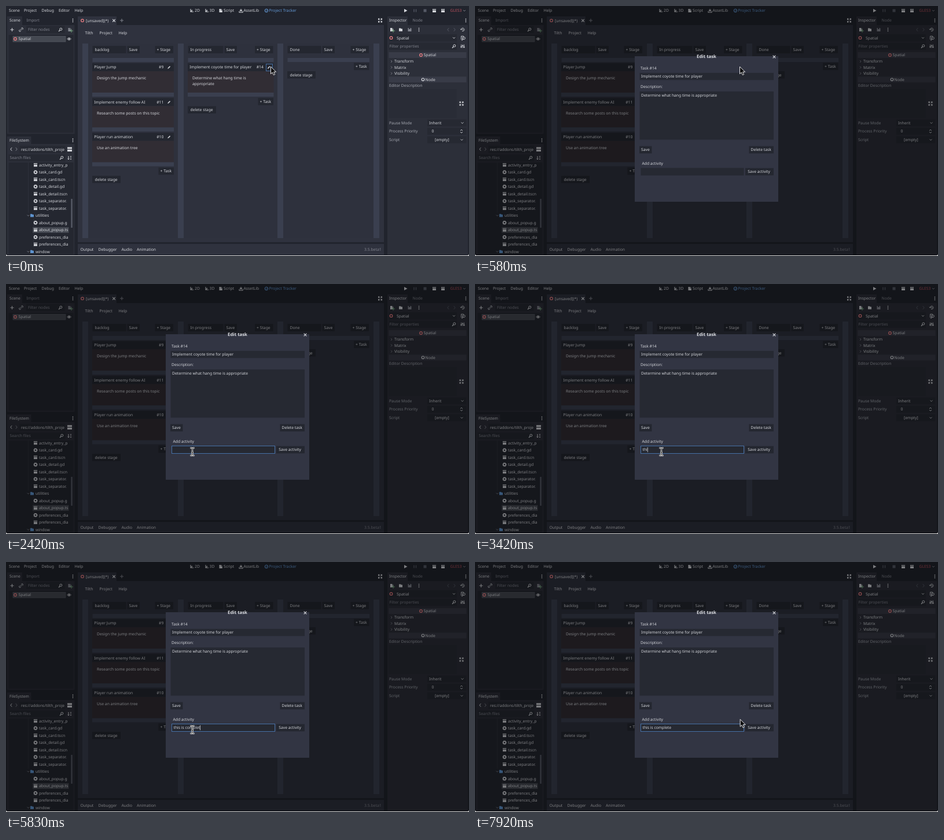
These frames come from a looping animation (800x433 px, 8000 ms). An HTML page:

```html
<!DOCTYPE html>
<html lang="en">
<head>
<meta charset="utf-8">
<title>Task editor</title>
<style>
html, body { margin: 0; width: 100%; height: 100%; overflow: hidden; background: #ddd; }
svg { display: block; width: 800px; height: 433px; }
text { font: 6.8px "Noto Sans", sans-serif; fill: #d5d7dc; white-space: pre; text-rendering: geometricPrecision; }
#dialog text { font-size: 6.74px; }
#dialog #title { font-size: 7.8px; font-weight: bold; }
</style>
</head>
<body>
<svg id="stage" viewBox="0 0 800 433" xmlns="http://www.w3.org/2000/svg"></svg>
<script>
const C = {
  outer: '#21242d', dock: '#2c2f39', panel: '#2f323e', popup: '#323543', dark: '#242730', field: '#262932', button: '#242730',
  bar: '#3a3f4f', board: '#2e313d', group: '#383b47', row: '#444851', body: '#312d34',
  text: '#d5d7dc', dim: '#80838d', faint: '#555965', red: '#f08085', blue: '#659bd8', focus: '#4670a6', folder: '#5f94cf'
};

const rect = (x, y, x2, y2, fill, extra = '') =>
  `<rect x="${x}" y="${y}" width="${x2 - x}" height="${y2 - y}" fill="${fill}" ${extra}/>`;
const text = (x, y, value, fill = C.text, extra = '') =>
  `<text x="${x}" y="${y + 2.4}" style="fill:${fill}" ${extra}>${value}</text>`;
const line = (d, color = C.text, width = 1) =>
  `<path d="${d}" fill="none" stroke="${color}" stroke-width="${width}"/>`;
const shape = (d, color = C.text) => `<path d="${d}" fill="${color}"/>`;
const ring = (x, y, color = C.red) =>
  `<circle cx="${x}" cy="${y}" r="2.3" fill="none" stroke="${color}" stroke-width="1.2"/>`;
const at = (x, y, content) => `<g transform="translate(${x} ${y})">${content}</g>`;

const icon = {
  plus: (x, y, c) => at(x, y, line('M-3 0H3M0-3V3', c)),
  close: (x, y, c) => at(x, y, line('M-2.3-2.3L2.3 2.3M2.3-2.3L-2.3 2.3', c, 1.2)),
  down: (x, y, c) => at(x, y, line('M-2-1L0 1L2-1', c, .9)),
  right: (x, y, c) => at(x, y, line('M-1-2L1 0L-1 2', c, .9)),
  back: (x, y, c) => at(x, y, line('M1.2-2.8L-1.2 0L1.2 2.8', c)),
  forward: (x, y, c) => at(x, y, line('M-1.2-2.8L1.2 0L-1.2 2.8', c)),
  updown: (x, y, c) => icon.down(x, y + 2, c) + at(x, y - 2, line('M-2 1L0-1L2 1', c, .9)),
  dots: (x, y) => at(x, y, line('M0-3.2v1.4M0-.7v1.4M0 1.8v1.4', C.text, 1.4)),
  search: (x, y) => at(x, y, '<circle cx=".8" cy="-.8" r="2" fill="none" stroke="#d5d7dc"/>' + line('M-.6.6L-3 3', C.text, 1.3)),
  gear: (x, y) => at(x, y, '<circle r="2.2" fill="none" stroke="#d5d7dc" stroke-width="1.5"/>' +
    '<circle r="3" fill="none" stroke="#d5d7dc" stroke-width="1.2" stroke-dasharray="1.2 1.156"/>'),
  clapper: (x, y, c) => at(x, y, shape('M-3-.5H3V3H-3ZM-3-3L3-3V-1.2H-3Z', c) + line('M-1.5-3l1 1.8M1-3l1 1.8', C.dark, .7)),
  folder: (x, y, c = C.folder) => at(x, y, shape('M-3-2.5H0L1-1.5H3V2.7H-3Z', c)),
  page: (x, y, c) => at(x, y, shape('M-2.5-3H.5V-.6H2.8V3H-2.5ZM1-3L2.8-1.2H1Z', c)),
  expand: (x, y) => at(x, y, line('M-1-1L-3-3M1-1L3-3M-1 1L-3 3M1 1L3 3', C.text, 1.1) +
    shape('M-3.5-3.5h3l-3 3ZM3.5-3.5v3l-3-3ZM-3.5 3.5v-3l3 3ZM3.5 3.5h-3l3-3Z')),
  pencil: (x, y, c) => at(x, y, line('M-1.6 1.6L1.5-1.5', c, 1.6) + shape('M-2.7 2.7l.5-1.8l1.3 1.3Z', c)),
  axes: (x, y) => at(x, y, line('M-2-3V2H3M-2 2L1-1', C.text, 1.1)),
  eye: (x, y) => at(x, y, line('M-3.3 0Q0-4 3.3 0Q0 4-3.3 0Z', C.text, .9) + '<circle r="1.2" fill="#d5d7dc"/>'),
  sort: (x, y) => at(x, y, line('M-2-3V3M-3.3 1.5L-2 3L-.7 1.5M1-2.5H3M1 0H3M1 2.5H3', C.text, 1))
};

const button = (x, y, x2, label, pad = 3) =>
  rect(x, y - 6.3, x2, y + 6.3, C.button) + text(x + pad, y, label);
const separator = (x, x2, y) => rect(x, y, x2, y + 7, C.bar);

function card(x, x2, y, title, id, lines) {
  return rect(x, y - 7, x2, y + 7, C.dark) + rect(x, y + 7, x2, y + 44, C.body) +
    text(x + 3.3, y, title) + text(x2 - 17.7, y, id, C.text, 'text-anchor="end"') +
    lines.map((s, i) => text(x + 8, y + 19 + i * 10, s)).join('') + separator(x, x2, y + 44);
}

function stageHead(x, x2, name, saveX, addX) {
  return rect(x, 69, saveX - 2, 82, C.dark) + text(x + 4, 75.5, name) +
    button(saveX, 75.5, saveX + 21.5, 'Save') + button(addX, 75.5, x2 - 1, '+ Stage') +
    separator(x, x2, 90);
}

function topBar() {
  const menu = [[5, 'Scene'], [31, 'Project'], [61.5, 'Debug'], [91, 'Editor'], [118.5, 'Help']];
  const modes = [[326, '2D'], [351.5, '3D'], [376, 'Script'], [410.5, 'AssetLib']];
  return [...menu, ...modes].map(([x, s]) => text(x, 8, s)).join('') +
    icon.axes(321, 8) + icon.axes(347, 8) + icon.page(371, 8) +
    at(406, 8, line('M0-3V1M-2-1L0 1L2-1M-3 1V3H3V1', C.text, 1.1)) +
    at(450, 8, `<circle r="2.8" fill="none" stroke="${C.blue}"/>` + line('M-1.4 0L-.2 1.2L1.6-1.2', C.blue, .8)) +
    text(454.5, 8, 'Project Tracker', C.blue) +
    shape('M688 5L693.5 8L688 11Z') + line('M705 5.5v5M708.5 5.5v5', C.faint, 1.4) +
    rect(721.5, 5.5, 726.5, 10.5, C.faint) + icon.clapper(740, 8) + icon.clapper(755, 8) +
    text(767.5, 8, 'GLES3', '#b8505c') + icon.down(792, 8, C.dim);
}

function sceneDock() {
  return rect(2, 18, 28, 34, C.dock) + rect(2, 33, 118.5, 221.5, C.dock) +
    text(6, 25, 'Scene') + text(35.5, 25, 'Import', C.dim) + icon.dots(115.5, 25) +
    icon.plus(10.5, 41) + at(26, 41, line('M-1.2 1.2L1.2-1.2M0-1.8l1-1a1.4 1.4 0 0 1 2 2l-1 1M0 1.8l-1 1a1.4 1.4 0 0 1-2-2l1-1', C.text, .9)) +
    rect(35, 34.5, 101.5, 47, C.field) + text(38, 41, 'Filter nodes', C.dim) + icon.search(94, 41) +
    icon.page(110, 41, C.dim) + icon.plus(113, 43, '#6f9f78') +
    rect(4.5, 50, 116.5, 219.5, C.dark) +
    rect(12, 52.3, 103, 62, C.row, 'stroke="#5a5e69" stroke-width=".6"') +
    ring(16, 57) + text(21.5, 57, 'Spatial') + icon.eye(109, 57);
}

function fileDock() {
  const files = ['activity_entry_p', 'task_card.gd', 'task_card.tscn', 'task_detail.gd', 'task_detail.tscn',
    'task_separator.', 'task_separator.', '/utilities', 'about_popup.g', 'about_popup.ts',
    'preferences_dia', 'preferences_dia', '/window'];
  const gears = [1, 3, 5, 8, 10];
  const rows = files.map((name, i) => {
    const y = 275.3 + i * 12.5;
    if (name[0] === '/') return icon.down(38.5, y, C.dim) + icon.folder(45, y) + text(51, y, name.slice(1));
    return (gears.includes(i) ? icon.gear : icon.clapper)(51, y) + text(57, y, name);
  }).join('');
  return rect(2, 226, 43.5, 240, C.dock) + rect(2, 239, 118.5, 431, C.dock) +
    text(6, 232.5, 'FileSystem') + icon.dots(115.5, 232.5) +
    icon.back(9, 248) + icon.forward(18, 248, C.dim) +
    rect(23.5, 242, 102.5, 254.5, C.field) + text(26, 248.4, 'res://addons/tilth_proje') +
    rect(106, 244.5, 114, 247.5, C.text) + rect(106, 248.7, 114, 252, C.text) +
    rect(4.5, 257, 102.5, 269, C.field) + text(6.5, 263, 'Search files', C.dim) + icon.search(96, 263) + icon.sort(110, 263) +
    rect(4.5, 271, 116.5, 430, C.dark) + rect(46, 383, 108.5, 393, C.row) +
    line('M38.5 271V358M47.5 368V418', '#343843', .6) +
    `<g clip-path="url(#files)">${rows}</g>` + rect(112.3, 334, 114.8, 384, '#555965');
}

function inspectorDock() {
  const groups = [['Transform', 96], ['Matrix', 106.3], ['Visibility', 116.8]];
  const property = (y, label, x, value) => text(662, y, label, '#a6a9b2') +
    rect(728, y - 6, 795.5, y + 6, C.field) + text(x, y, value);
  return rect(659, 18, 694, 34, C.dock) + rect(659, 33, 798, 431, C.dock) +
    text(662, 25, 'Inspector') + text(702.5, 25, 'Node', C.dim) + icon.dots(794.5, 25) +
    icon.page(666.5, 41) + icon.plus(669, 43, '#6f9f78') + icon.folder(682, 41, C.text) +
    at(697.5, 41, shape('M-3-3H2L3-2V3H-3ZM-1.5-3V-1H1V-3Z', C.dim)) + icon.dots(713.5, 41) +
    icon.back(764, 41, C.faint) + icon.forward(775, 41, C.faint) +
    at(789, 41, line('M-2.5 0A2.7 2.7 0 1 1-1 2.3M-4-1.2l1.4 1.5l1.5-1.3M.2-1.5V.3H1.5', C.text, .9)) +
    rect(661.5, 49, 779, 61.5, C.field) + ring(665.5, 55.2) + text(675, 55.2, 'Spatial') + icon.down(774, 55.2) +
    at(789, 55.2, line('M-2.5 3V-3H1.5V-1M-1-1H0M-1 1H0', C.text, .9)) + icon.search(790.5, 56.5) +
    rect(661.5, 63.5, 779, 76, C.field) + text(662.5, 69.7, 'Filter properties', C.dim) + icon.search(774, 69.7) +
    at(789, 69.7, line('M-2.5-3V3M0-3V3M2.5-3V3', C.text, .8) + line('M-3.6 1H-1.3M-1.2-1H1.2M1.3 1.5H3.6', C.text, 1.5)) +
    rect(661.5, 80, 795.5, 90, C.group) + ring(717, 85) + text(721.5, 85, 'Spatial') +
    groups.map(([s, y]) => icon.right(666, y, C.dim) + text(671, y, s)).join('') +
    rect(661.5, 122.3, 795.5, 132.3, C.group) + ring(720.5, 127.3, C.text) + text(724.5, 127.3, 'Node') +
    text(662, 138, 'Editor Description', '#a6a9b2') + rect(661.5, 144, 778.5, 194, '#292c36') + icon.expand(787, 169) +
    property(202.5, 'Pause Mode', 731, 'Inherit') + icon.down(788.5, 202.5) +
    property(217, 'Process Priority', 735.5, '0') + icon.updown(787, 217) +
    property(231.7, 'Script', 741, '[empty]') + icon.down(787.5, 231.7);
}

function board() {
  const footer = [[128.5, 'Output'], [159.5, 'Debugger'], [199.5, 'Audio'], [226, 'Animation']];
  return rect(124, 18, 191, 34, C.panel) + rect(124, 33, 653, 409, C.panel) + rect(124, 412, 653, 431, C.panel) +
    ring(132, 25.2) + text(138, 25.2, '[unsaved](*)') + icon.close(186.5, 25.2) + icon.plus(200, 25, C.dim) + icon.expand(646.5, 25) +
    text(136.5, 46.5, 'Tilth') + text(161.5, 46.5, 'Project') + text(194.5, 46.5, 'Help') +
    rect(132, 65, 645, 402, C.board) + [132, 297, 469, 635].map(x => rect(x, 65, x + 10, 402, C.bar)).join('') +
    stageHead(149.5, 290, 'backlog', 209.5, 257.5) + stageHead(314.5, 462.5, 'In progress', 377.5, 430) +
    stageHead(486.5, 628, 'Done', 546.5, 595.5) +
    card(149, 290, 106, 'Player Jump', '#9', ['Design the jump mechanic']) +
    card(149, 290, 166.3, 'Implement enemy follow AI', '#11', ['Research some posts on this topic']) +
    card(149, 290, 226.6, 'Player run animation', '#10', ['Use an animation tree']) +
    card(314, 462.5, 106, 'Implement coyote time for player', '#14', ['Determine what hang time is', 'appropriate']) +
    [106, 166.3, 226.6].map(y => icon.pencil(282, y)).join('') +
    button(263.5, 286, 290, '+ Task') + button(149, 300.3, 198, 'delete stage', 4.5) +
    button(435.5, 165.5, 462, '+ Task') + button(314, 179.8, 363, 'delete stage', 4.5) +
    button(601, 104.8, 627.5, '+ Task') + button(486, 119.3, 535, 'delete stage', 4.5) +
    rect(449.5, 100.5, 460.5, 112.5, C.dark, `stroke="${C.focus}"`) +
    `<g id="editIcon">${icon.pencil(454.5, 106)}</g>` +
    footer.map(([x, s]) => text(x, 422, s)).join('') + text(619, 422, '3.5.beta1', C.dim);
}

function dialog() {
  return rect(0, 0, 800, 432, '#000', 'opacity=".42"') +
    rect(276, 87, 524, 339, C.popup) +
    text(400, 88, 'Edit task', '#dcdee3', 'text-anchor="middle" id="title"') + icon.close(517, 88) +
    text(286, 107.5, 'Task #14') + rect(284.5, 115.8, 516, 128.3, C.field) + text(287, 122, 'Implement coyote time for player') +
    text(286, 140, 'Description:') + rect(284.5, 148, 516, 231.5, C.field) + text(287, 155, 'Determine what hang time is appropriate') +
    button(284, 249, 305.5, 'Save') + button(473.5, 249, 516, 'Delete task') +
    text(288.5, 272.5, 'Add activity') +
    rect(286.5, 280.5, 464.5, 293.5, C.field, 'id="input"') + text(289.5, 287, '', C.text, 'id="typed"') +
    rect(0, 282.8, .8, 291.3, C.text, 'id="caret"') + button(467, 287, 516, 'Save activity', 4.3);
}

document.getElementById('stage').innerHTML =
  '<defs><clipPath id="files"><path d="M4 271H108.5V430H4Z"/></clipPath>' +
  '<clipPath id="window"><path d="M0 0H800V429Q800 432 797 432H3Q0 432 0 429Z"/></clipPath></defs>' +
  '<g clip-path="url(#window)">' + rect(0, 0, 800, 433, C.outer) +
  topBar() + sceneDock() + fileDock() + inspectorDock() + board() + `<g id="dialog">${dialog()}</g></g>` +
  '<path id="arrow" d="M.5 0V12.6L3.3 10L5.4 14.5L7.6 13.5L5.6 9.2H9.6Z" fill="#0b0b0d" stroke="#fff" stroke-width=".9"/>' +
  '<g id="beam">' + line('M-3.5-6.5H-1.5L0-5L1.5-6.5H3.5M0-5V5M-3.5 6.5H-1.5L0 5L1.5 6.5H3.5M-2 1.5H2', '#fff', 2.6) +
  line('M-3-6.5H-1.5L0-5L1.5-6.5H3M0-5V5M-3 6.5H-1.5L0 5L1.5 6.5H3M-1.6 1.5H1.6', '#111', 1) + '</g>';

const el = Object.fromEntries([...document.querySelectorAll('[id]')].map(node => [node.id, node]));

const LOOP = 8000, PRESS = 420, OPEN = 580, FOCUS = 1830, BLINK = 580;
const MESSAGE = 'this is complete';
const keyTimes = [3250, 3330, 3420, 3500, 3580, 3670, 3750, 3920, 5250, 5330, 5420, 5500, 5580, 5670, 5830, 5920];
const textFields = [[284, 116, 516, 128], [284, 148, 516, 231], [286, 280, 465, 294]];

const clamp = u => Math.max(0, Math.min(1, u));
const show = (node, on) => node.setAttribute('visibility', on ? 'inherit' : 'hidden');
const mix = (a, b, u) => a + (b - a) * u;

function pointer(t) {
  const away = clamp((t - 750) / 830);
  const down = away * away * (3 - 2 * away);
  const back = 1 - (1 - clamp((t - 7420) / 500)) ** 3;
  return [mix(mix(457, 322, down), 457.7, back), mix(mix(105, 290.5, down), 272.5, back)];
}

function render(t) {
  const open = t >= OPEN, focused = t >= FOCUS;
  show(el.dialog, open);
  el.editIcon.setAttribute('opacity', t < PRESS ? 1 : .45);

  const count = keyTimes.filter(k => k <= t).length;
  el.typed.textContent = MESSAGE.slice(0, count);
  el.input.setAttribute('stroke', focused ? C.focus : 'none');
  const lastEvent = count ? keyTimes[count - 1] : FOCUS;
  show(el.caret, open && focused && Math.floor((t - lastEvent) / BLINK) % 2 === 0);
  el.caret.setAttribute('x', 289.5 + (count ? el.typed.getComputedTextLength() : 0));

  const [x, y] = pointer(t);
  const overText = open && textFields.some(([l, top, r, b]) => x > l && x < r && y > top && y < b);
  for (const node of [el.arrow, el.beam]) node.setAttribute('transform', `translate(${x} ${y})`);
  show(el.arrow, !overText);
  show(el.beam, overText);
}

const start = performance.now();
function tick() {
  render((performance.now() - start) % LOOP);
  requestAnimationFrame(tick);
}
tick();
</script>
</body>
</html>
```
